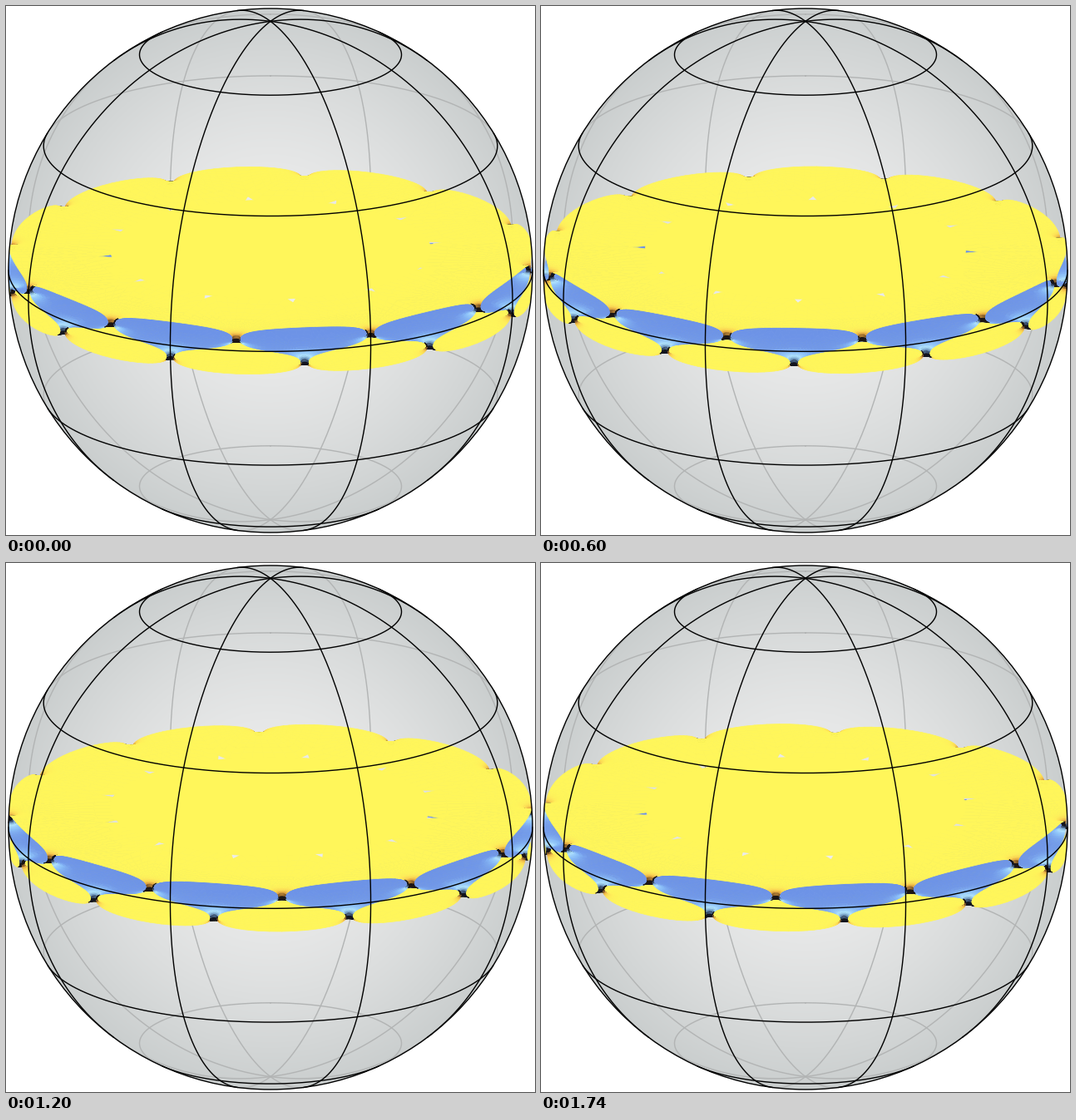
A matplotlib script for the animation above (1800 ms loop, 636 by 636 pixels).

```python
import numpy as np
import matplotlib.pyplot as plt
from matplotlib.animation import FuncAnimation
from matplotlib.collections import PolyCollection
from matplotlib.patches import Circle

SIZE, DPI = 636, 100
CENTER, RADIUS = 318, 315
TILT = np.radians(18)
FRAMES, INTERVAL = 30, 60
PX = 72 / DPI

# Three stacked disks joined by small half-catenoid necks along the rim.
FOLDS = 12
PITCH = 2 * np.pi / FOLDS
NECK = np.radians(0.7)
GAP = np.radians(2.7)
DEPTH = 0.5
UPPER, LOWER = 0, PITCH / 2

# Colour by steepness of the visible side, in degrees.
ANGLES = [0, 9, 18, 34, 55, 78, 105]
YELLOW = np.array([(255, 246, 90), (255, 246, 90), (255, 240, 90), (252, 214, 84),
                   (222, 160, 62), (105, 72, 36), (28, 22, 20)]) / 255
BLUE = np.array([(108, 146, 230), (113, 152, 233), (138, 190, 249), (178, 229, 255),
                 (122, 165, 205), (45, 62, 90), (18, 20, 30)]) / 255


def view(lon, r, z):
    """Right, up and toward-viewer coordinates of a cylindrical point."""
    s, c = np.sin(TILT), np.cos(TILT)
    out = r * np.cos(lon)
    return np.stack([r * np.sin(lon), z * c - out * s, out * c + z * s], axis=-1)


def to_screen(p):
    return CENTER + RADIUS * p[..., :2] * [1, -1]


def rise(s, neck):
    """Catenoid height above the waist of the necks; s is log r + i lon."""
    d = np.abs(np.exp(FOLDS * (s - 1j * neck)) - 1) / FOLDS
    return GAP * np.arccosh(np.maximum(d / NECK, 1)) / np.arccosh(2 / FOLDS / NECK)


def top(s):
    return GAP + rise(s, UPPER)


def middle(s):
    return rise(s, LOWER) - rise(s, UPPER)


def bottom(s):
    return -GAP - rise(s, LOWER)


def cell(neck, half, height):
    """Grid of one sheet fanning out from a neck, for every neck around the rim."""
    beta = np.linspace(np.pi / 2, 3 * np.pi / 2, 23)[:, None]
    t = np.linspace(0, 1, 16)
    reach = np.minimum(DEPTH / np.maximum(np.abs(np.cos(beta)), 1e-9),
                       half / np.maximum(np.abs(np.sin(beta)), 1e-9))
    s = NECK * (reach / NECK) ** t * np.exp(1j * beta) + 1j * neck
    z = np.sin(height(s))
    r = np.exp(s.real) * np.sqrt(1 - z ** 2)
    turns = PITCH * np.arange(FOLDS)[:, None, None]
    lon = s.imag + turns
    return lon, np.broadcast_to(r, lon.shape), np.broadcast_to(z, lon.shape)


def ramp(angle, colors):
    return np.stack([np.interp(angle, ANGLES, ch) for ch in colors.T], axis=-1)


SHEETS = [(cell(UPPER, PITCH / 2, top), False),
          (cell(UPPER, PITCH / 4, middle), True),
          (cell(LOWER, PITCH / 4, middle), True),
          (cell(LOWER, PITCH / 2, bottom), False)]
POLE = view(0.0, 0.0, 1.0)


def quads(sheet, blue_up, shift, cull):
    lon, r, z = sheet
    p = view(lon + shift, r, z)
    a, b, c, d = p[:, :-1, :-1], p[:, :-1, 1:], p[:, 1:, 1:], p[:, 1:, :-1]
    quad = np.stack([a, b, c, d], axis=-2).reshape(-1, 4, 3)
    quad = quad[quad[..., 2].mean(axis=1) > cull]
    normal = np.cross(quad[:, 2] - quad[:, 0], quad[:, 3] - quad[:, 1])
    normal /= np.linalg.norm(normal, axis=1, keepdims=True) + 1e-12
    up = normal[:, 2] > 0
    normal[~up] *= -1
    angle = np.degrees(np.arccos(np.clip(normal @ POLE, -1, 1)))
    blue = up == blue_up
    return quad, np.where(blue[:, None], ramp(angle, BLUE), ramp(angle, YELLOW))


def surface_at(shift):
    """Polygons of all sheets, back to front, with their colours."""
    # The lower sheets are hidden at the back.
    parts = [quads(sheet, blue_up, shift, -2 if i == 0 else -0.3)
             for i, (sheet, blue_up) in enumerate(SHEETS)]
    quad = np.concatenate([q for q, _ in parts])
    color = np.concatenate([c for _, c in parts])
    order = np.argsort(quad[..., 2].mean(axis=1))
    inner = view(np.linspace(0, 2 * np.pi, 121), np.exp(-DEPTH) + 0.005,
                 np.full(121, np.sin(top(-DEPTH))))
    verts = list(to_screen(quad[order])) + [to_screen(inner)]
    return verts, np.vstack([color[order], YELLOW[:1]])


def grid_line(ax, lon, lat):
    p = view(lon, np.cos(lat), np.sin(lat))
    xy = to_screen(p)
    for side, color, z in ((p[:, 2] < 0, "#b2b4b4", 2), (p[:, 2] >= 0, "black", 4)):
        part = np.where(side[:, None], xy, np.nan)
        ax.plot(part[:, 0], part[:, 1], color=color, lw=1.4 * PX, zorder=z)


fig = plt.figure(figsize=(SIZE / DPI, SIZE / DPI), dpi=DPI, facecolor="white")
ax = fig.add_axes([0, 0, 1, 1])
ax.set_axis_off()

y, x = np.mgrid[:SIZE, :SIZE] + 0.5
dist = np.clip(np.hypot(x - CENTER, y - CENTER) / RADIUS, 0, 1)
shade = 239 - dist[..., None] ** 1.6 * [37, 33, 33]
ball = ax.imshow(shade / 255, extent=(0, SIZE, SIZE, 0), zorder=1)
ball.set_clip_path(Circle((CENTER, CENTER), RADIUS, transform=ax.transData))
ax.add_patch(Circle((CENTER, CENTER), RADIUS, fill=False, ec="black",
                    lw=1.4 * PX, zorder=5))

turn = np.linspace(-np.pi, np.pi, 721)
for lat in (-60, -30, 0, 30, 60):
    grid_line(ax, turn, np.full_like(turn, np.radians(lat)))
for lon in np.arange(22.5, 360, 45):
    grid_line(ax, np.full_like(turn, np.radians(lon)), turn / 2)

surface = PolyCollection([], linewidths=0.7 * PX, joinstyle="round", zorder=3)
ax.add_collection(surface)
ax.set_xlim(0, SIZE)
ax.set_ylim(SIZE, 0)


def update(i):
    verts, color = surface_at(-PITCH * (0.25 + i / FRAMES))
    surface.set_verts(verts)
    surface.set_facecolor(color)
    surface.set_edgecolor(color)
    return surface,


anim = FuncAnimation(fig, update, frames=FRAMES, interval=INTERVAL,
                     repeat=True, repeat_delay=0)
plt.show()
```
